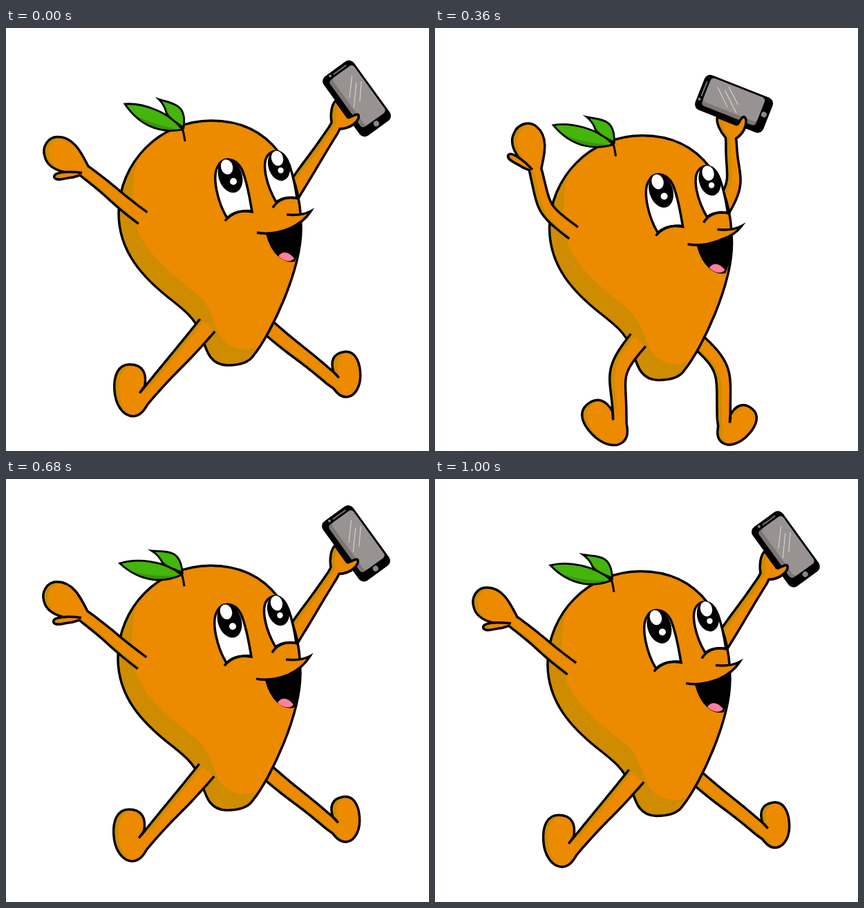
Write an HTML page with a canvas that moves like this. It is 612 px wide and 612 px high and loops after 1040 ms.

```html
<!DOCTYPE html>
<html lang="en">
<head>
<meta charset="utf-8">
<title>Jumping mango</title>
<style>
  html, body { margin: 0; width: 100%; height: 100%; overflow: hidden; background: #fff; }
  canvas { display: block; }
</style>
</head>
<body>
<canvas id="stage" width="612" height="612"></canvas>
<script>
const ctx = document.getElementById('stage').getContext('2d');
const ORANGE = '#ec8a00', SHADE = '#cf8c00', LINE = 3.5;
const PERIOD = 1040, STEP = 40, CROUCH = 360, LAG = 25;

// Outlines around the limb's end point: pairs are lines, sixes are curves.
const foot = [[-5.5, -8.5], [2, -19], [5, -36, 0, -50, -20, -50], [-37, -50, -43, -33, -42, -14],
  [-41, 9, -29, 25, -15, 25], [-4, 25, 2, 15, 6, 8]];
const palm = [[6, -6.5], [-3, -24, -14, -49, -38, -49], [-53, -49, -61, -34, -57, -21],
  [-54, -7, -41, -1, -29, 2], [-36, 3, -45, 4, -43, 10], [-39, 16, -26, 10, -16, 9.5], [-6, 6.5]];
const grip = [[-7, -4], [-9, -17, -7, -30, -1, -36], [17, -11], [24, -13, 29, -18, 32, -15], [34, -9, 24, 4, 5, 5]];

// rest is the spread pose (x, y, turn) and tuck the change when crouched.
// A negative width starts the outline on the other side.
const limbs = {
  legL: { root: [291.5, 430], heading: 130, widths: [28, 19], end: foot,
    rest: [198.8, 536.7, 0], tuck: [66, 12, -41], start: 60, release: [400, 650] },
  legR: { root: [370, 425], heading: 41, widths: [-22, -19], end: foot, scale: [-.87, .87],
    rest: [478, 514, -8], tuck: [-62.5, 38.5, 48], start: 90, release: [360, 550] },
  armL: { root: [198, 275], heading: 217, widths: [21, 18], end: palm,
    rest: [113, 206.5, 0], tuck: [29.5, -23.5, 40], start: 20, release: [360, 550] },
  armR: { root: [409, 246], heading: -57, widths: [-24, -15], end: grip,
    rest: [478, 141, 0], tuck: [-52, -4, -33], start: 30, release: [400, 650] }
};

const rad = deg => deg * Math.PI / 180;
const part = (t, a, b) => Math.min(1, Math.max(0, (t - a) / (b - a)));
const ramp = (t, a, b) => { const u = part(t, a, b); return u * u * (3 - 2 * u); };
const easeOut = (t, a, b) => 1 - (1 - part(t, a, b)) ** 2;

// Sink, leap past the rest height, settle.
const bodyDrop = t => 21.5 * ramp(t, 100, CROUCH) - 32.5 * ramp(t, 520, 650) + 10.5 * easeOut(t, 640, 1000);

const leafTurn = t => -6 * ramp(t, 0, 160) - 7.5 * ramp(t, 400, 640)
  + 10 * ramp(t, 680, 800) - 6.5 * ramp(t, 800, 1000);

// Hands and feet turn slightly after the limb moves.
function limbPose({ rest, tuck, start, release }, t, [bx, by]) {
  const bend = time => ramp(time, start, CROUCH) - ramp(time, ...release);
  const now = bend(t);
  return [rest[0] + bx + tuck[0] * now, rest[1] + by + tuck[1] * now, rest[2] + tuck[2] * bend(t - LAG)];
}

function shape(d, fill, width = LINE, stroke = '#000') {
  const path = new Path2D(d);
  if (fill) { ctx.fillStyle = fill; ctx.fill(path); }
  if (width) { ctx.lineWidth = width; ctx.strokeStyle = stroke; ctx.stroke(path); }
}

function oval(x, y, rx, ry, fill, tilt = 0) {
  ctx.beginPath();
  ctx.ellipse(x, y, rx, ry, rad(tilt), 0, 7);
  ctx.fillStyle = fill;
  ctx.fill();
}

function box(x, y, w, h, r, fill) {
  ctx.beginPath();
  ctx.roundRect(x, y, w, h, r);
  ctx.fillStyle = fill;
  ctx.fill();
}

function within(x, y, deg, draw) {
  ctx.save();
  ctx.translate(x, y);
  ctx.rotate(rad(deg));
  draw();
  ctx.restore();
}

// Both sides of a tapering tube along a cubic curve.
function tube({ root, heading, widths: [w0, w1], rest }, [bx, by], [x, y, turn]) {
  const x0 = root[0] + bx, y0 = root[1] + by;
  const reach = .55 * Math.hypot(x - x0, y - y0);
  const a = rad(heading), b = rad(heading + turn - rest[2]);
  const xs = [x0, x0 + reach * Math.cos(a), x - reach * Math.cos(b), x];
  const ys = [y0, y0 + reach * Math.sin(a), y - reach * Math.sin(b), y];
  const pos = (p, u, v = 1 - u) => v ** 3 * p[0] + 3 * v * v * u * p[1] + 3 * v * u * u * p[2] + u ** 3 * p[3];
  const vel = (p, u, v = 1 - u) => v * v * (p[1] - p[0]) + 2 * u * v * (p[2] - p[1]) + u * u * (p[3] - p[2]);
  const near = [], far = [];
  for (let i = 0; i <= 24; i++) {
    const u = i / 24, dx = vel(xs, u), dy = vel(ys, u);
    const half = (w0 + (w1 - w0) * u) / 2 / Math.hypot(dx, dy);
    const px = pos(xs, u), py = pos(ys, u);
    near.push([px - dy * half, py + dx * half]);
    far.unshift([px + dy * half, py - dx * half]);
  }
  return { near, far };
}

function drawLimb(limb, body, pose) {
  const { near, far } = tube(limb, body, pose);
  const trace = () => {
    ctx.beginPath();
    near.slice(0, -1).forEach(p => ctx.lineTo(...p));
    within(...pose, () => {
      ctx.scale(...(limb.scale || [1, 1]));
      limb.end.forEach(p => p.length > 2 ? ctx.bezierCurveTo(...p) : ctx.lineTo(...p));
    });
    far.slice(1).forEach(p => ctx.lineTo(...p));
  };
  trace();
  ctx.fillStyle = SHADE;
  ctx.fill();
  ctx.save();
  ctx.clip();
  ctx.translate(7, 1);
  trace();
  ctx.fillStyle = ORANGE;
  ctx.fill();
  ctx.restore();
  trace();
  ctx.lineWidth = LINE;
  ctx.strokeStyle = '#000';
  ctx.stroke();
}

function drawPhone() {
  within(29.5, -39, 54, () => {
    box(-53, -27, 106, 54, 9, '#000');
    box(-44, -24, 84, 43, 5, '#7c7777');
    box(-44, -24, 84, 37, 5, '#989292');
    shape('M-48,7V-16', null, 2, '#777');
    oval(-49, 12, 2, 2, '#888');
    oval(46, -1.5, 4, 4, '#888');
    shape('M-31,-14L-7,8M-19,-13L8,11M-16,-20L6,-1', null, 1, '#ddd');
  });
  shape('M17,-11C24,-13 29,-18 32,-15C34,-9 24,4 5,5', ORANGE);
}

function drawBody() {
  const outline = 'M297,134C222,134 163,195 163,268C163,325 200,362 235,390C262,411 272,420 281,440'
    + 'C289,460 291,487 320,488C345,488 354,480 358,474C385,440 427,350 427,290C427,205 385,134 297,134Z';
  ctx.save();
  ctx.clip(new Path2D(outline));
  shape(outline, ORANGE, 0);
  shape('M200,165C180,205 180,255 190,292C204,326 236,352 270,380C294,396 296,415 307,440'
    + 'C317,460 338,470 362,462L360,500H280L140,380V165Z', SHADE, 0);
  ctx.restore();
  shape(outline);
}

// The smile lags behind the body by lift.
function drawFace(lift) {
  shape('M320,275C306,252 298,216 306,201C313,186 331,186 341,204C349,222 353,248 356,266Q332,262 320,275', '#fff');
  oval(324.5, 214, 17, 25, '#000', -18);
  oval(319.5, 201, 8.5, 11, '#fff', -18);
  oval(329, 222, 5, 5, '#fff');
  shape('M317,279Q331,262 357,265');

  shape('M391,252C377,228 369,196 379,184C389,173 403,180 410,198C416,215 419,232 421,246Q402,243 391,252', '#fff');
  oval(395, 199, 15.5, 22.5, '#000', -16);
  oval(392.5, 188.5, 8.5, 11, '#fff', -16);
  oval(397.5, 206, 4.2, 4.2, '#fff');
  shape('M386,260Q398,241 424,247');

  within(0, -lift, 0, () => {
    shape('M377,298C385,328 402,340 417,337C424,322 427,302 427,283Q405,296 377,298Z', '#000', 2);
    shape('M394,330Q404,318 417,333Q414,338 406,337Q398,335 394,330Z', '#ff7f9c', 0);
  });
  const nose = `M406,270Q428,272 441,265Q431,${281 - lift / 2} 410,${290 - lift}`;
  shape(nose + 'L395,285Z', ORANGE, 0);
  shape(nose + `Q385,${300 - lift} 363,${296 - lift}`);
}

function drawLeaves(turn) {
  shape('M254,142Q257,150 259,164', null, 3);
  within(257, 147, turn, () => {
    ctx.translate(-257, -147);
    const big = 'M172,110C197,108 236,121 255,147C229,152 196,146 172,110Z';
    const small = 'M221,103C241,110 262,109 257,144C241,133 232,128 231,119Q228,110 221,103Z';
    shape(big, '#44b50b', 0);
    shape('M184,124Q215,142 255,147C229,152 203,147 184,124Z', '#3d940f', 0);
    shape(big, null, 2.8);
    shape(small, '#44b50b', 0);
    shape('M231,119Q240,131 257,144C241,133 232,128 231,119Z', '#3d940f', 0);
    shape(small, null, 2.8);
  });
}

function draw(t) {
  const drop = bodyDrop(t), body = [.12 * drop, drop];
  const limb = name => {
    const pose = limbPose(limbs[name], t, body);
    drawLimb(limbs[name], body, pose);
    return pose;
  };
  ctx.fillStyle = '#fff';
  ctx.fillRect(0, 0, 612, 612);
  limb('legR');
  within(...limb('armR'), drawPhone);
  within(...body, 0, () => {
    drawBody();
    drawFace(.22 * drop);
    drawLeaves(leafTurn(t));
  });
  limb('legL');
  within(...limb('armL'), () => shape('M-30,2Q-18,1 -3,3'));
}

function tick() {
  draw(Math.floor(performance.now() % PERIOD / STEP) * STEP);
  requestAnimationFrame(tick);
}
tick();
</script>
</body>
</html>
```
